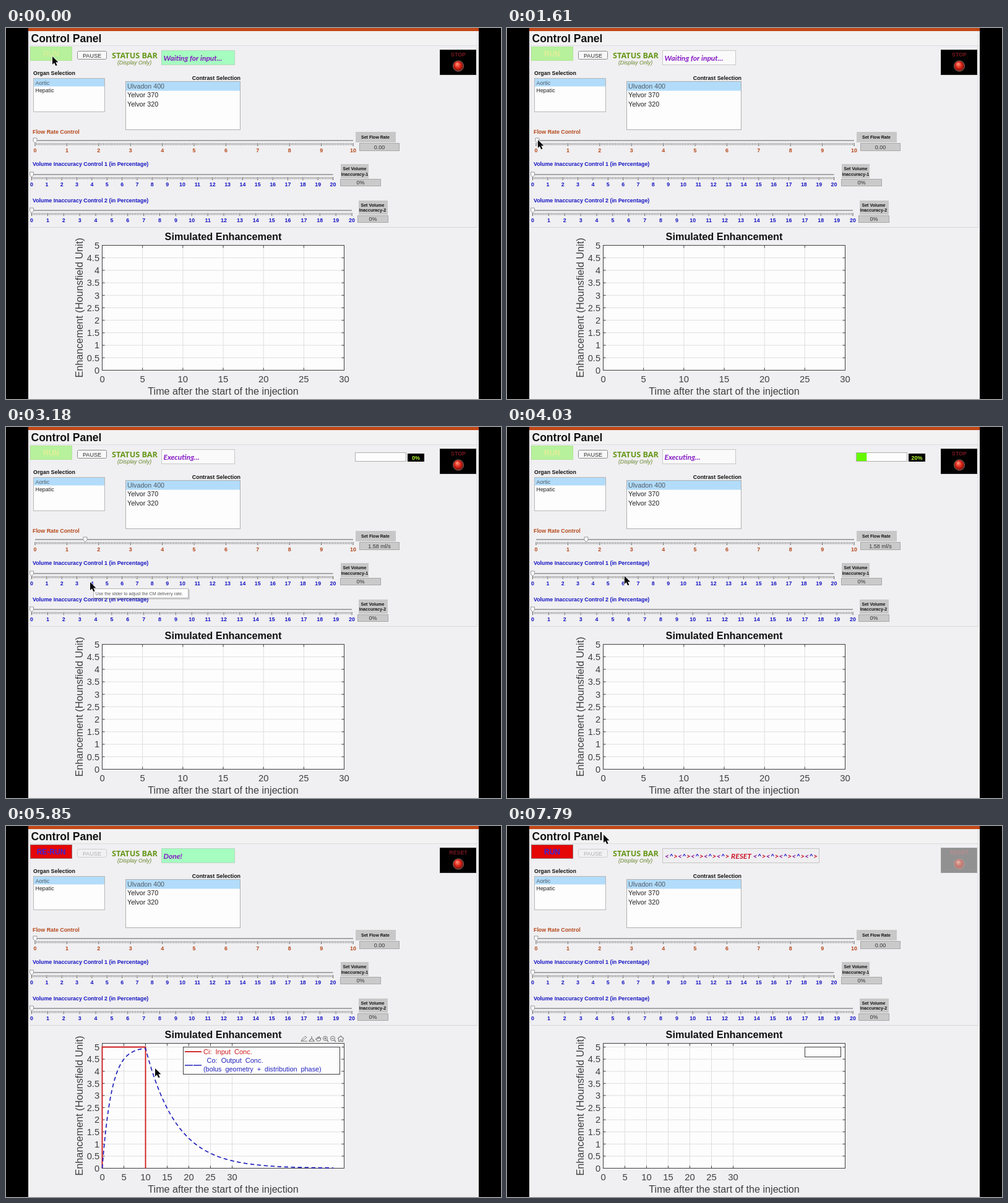
Animation of 800 by 600 pixels, one loop 7.85 s. Source, as an HTML page with a canvas:

```html
<!DOCTYPE html>
<html lang="en">
<head>
<meta charset="utf-8">
<title>Control Panel</title>
<style>
html, body { margin: 0; width: 100%; height: 100%; overflow: hidden; background: #000; }
canvas { display: block; }
</style>
</head>
<body>
<canvas id="stage" width="800" height="600"></canvas>
<script>
const ctx = document.getElementById('stage').getContext('2d');
const LOOP = 7850;
const SANS = '"Liberation Sans", Arial, sans-serif';
const LATO = 'Lato, "Open Sans", sans-serif';
const OPEN = '"Open Sans", "Noto Sans", sans-serif';
const RUST = '#b5491c', BLUE = '#1616c4', INK = '#404040', RED = '#d01818';

// Moments at which the interface changes state
const T = { calm: 520, grab: 1560, drop: 2120, exec: 2460, done: 5700, reset: 7000 };

// Pointer path: time, x, y
const path = [
  [0, 75, 46], [350, 76, 48], [900, 104, 181], [1060, 106, 183], [1240, 104, 183],
  [1500, 48, 181], [1560, 48, 181], [2120, 129, 181], [2450, 129, 181],
  [2950, 134, 246], [3180, 136, 251], [3520, 138, 251], [4050, 190, 241],
  [4790, 470, 240], [4820, 490, 238], [4850, 509, 236], [4880, 524, 241],
  [5000, 540, 248], [5600, 262, 380], [5850, 241, 392], [6200, 243, 392],
  [6800, 728, 62], [7150, 730, 62], [7720, 160, 17], [7790, 156, 14], [7850, 156, 14]
];

function pointer(t) {
  let i = 1;
  while (i < path.length - 1 && path[i][0] < t) i++;
  const [t0, x0, y0] = path[i - 1], [t1, x1, y1] = path[i];
  let k = Math.min(1, Math.max(0, (t - t0) / (t1 - t0)));
  if (t1 - t0 > 300) k = k * k * (3 - 2 * k);
  return [x0 + (x1 - x0) * k, y0 + (y1 - y0) * k];
}

function rect(x, y, w, h, fill, stroke) {
  ctx.fillStyle = fill;
  ctx.fillRect(x, y, w, h);
  if (!stroke) return;
  ctx.strokeStyle = stroke;
  ctx.lineWidth = 1;
  ctx.strokeRect(x + 0.5, y + 0.5, w - 1, h - 1);
}

function text(s, x, y, size, color, opt = {}) {
  ctx.font = `${opt.style || ''} ${size}px ${opt.family || SANS}`;
  ctx.textAlign = opt.align || 'left';
  ctx.fillStyle = color;
  ctx.fillText(s, x, y);
}
const bold = (s, x, y, size, color, align) => text(s, x, y, size, color, { style: 'bold', align });
const mid = (s, x, y, size, color) => text(s, x, y, size, color, { align: 'center' });

function line(points, color, width = 1, dash = []) {
  ctx.strokeStyle = color;
  ctx.lineWidth = width;
  ctx.setLineDash(dash);
  ctx.beginPath();
  points.forEach(([x, y]) => ctx.lineTo(x, y));
  ctx.stroke();
  ctx.setLineDash([]);
}

function arrow(x, y) {
  const shape = [[0, 0], [0, 13], [3, 10.3], [5.4, 15.2], [7.6, 14.2], [5.3, 9.4], [9.4, 9.2]];
  ctx.beginPath();
  shape.forEach(([dx, dy]) => ctx.lineTo(x + dx, y + dy));
  ctx.closePath();
  ctx.strokeStyle = 'rgba(255,255,255,.7)';
  ctx.lineWidth = 1.5;
  ctx.stroke();
  ctx.fillStyle = '#0a0a0a';
  ctx.fill();
}

function slider(x0, x1, y, max, color, labelY, thumb) {
  rect(x0, y, x1 - x0, 2, '#a6a6a6');
  const n = 200, step = (x1 - x0) / n, per = n / max;
  for (let i = 0; i <= n; i++) {
    const major = i % per === 0;
    rect(x0 + i * step - 0.5, y + 5, 1, major ? 5 : 3.5, major ? '#555' : '#858585');
  }
  for (let v = 0; v <= max; v++) {
    bold(v, x0 + v * (x1 - x0) / max, labelY, 8.85, color, 'center');
  }
  ctx.beginPath();
  [[-3, -3], [3, -3], [3, 2], [0, 5], [-3, 2]].forEach(([dx, dy]) => ctx.lineTo(thumb + dx, y + dy));
  ctx.closePath();
  ctx.fillStyle = '#fafafa';
  ctx.fill();
  ctx.strokeStyle = '#9a9a9a';
  ctx.lineWidth = 1;
  ctx.stroke();
}

function valueBox(x, y, w, h, s) {
  rect(x, y, w, h, '#cacaca', '#a8a8a8');
  mid(s, x + w / 2, y + h / 2 + 3.2, 9, '#333');
}

function tip(x, y, w, h, rows) {
  ctx.fillStyle = 'rgba(0,0,0,.14)';
  ctx.fillRect(x + 2, y + 2, w, h);
  rect(x, y, w, h, '#fcfcfc', '#b4b4b4');
  rows.forEach((s, i) => text(s, x + 3.5, y + 10.5 + i * 9.5, 7.2, '#5a5a5a'));
}

function frameBase() {
  rect(0, 0, 800, 600, '#000');
  rect(36, 0, 728, 600, '#f0eff1');
  rect(36, 0, 728, 5, '#c24816');
  rect(38, 5, 724, 23, '#f3f2f3');
  rect(38, 28, 724, 1, '#dcdbdd');
  rect(38, 322, 724, 1, '#d6d5d7');
  rect(38, 5, 1, 318, '#e2e1e3');
  rect(761, 5, 1, 318, '#dddcde');
  bold('Control Panel', 40.5, 23, 17.55, '#111');
}

function runButton(t) {
  const red = t >= T.done;
  rect(39, 30, 68, 23, red ? '#e50606' : '#b7f19b', red ? '#9a6a6a' : '#b0e698');
  const label = red && t < T.reset ? 'RE-RUN' : 'RUN';
  text(label, 73, 45.5, 12, red ? '#3a24d8' : '#e2ee98',
    { align: 'center', style: t < 120 ? '' : 'bold' });
  ctx.beginPath();
  ctx.roundRect(115.5, 37.5, 47, 13, 2);
  ctx.fillStyle = red ? '#f1f0f2' : '#f8f8f8';
  ctx.fill();
  ctx.strokeStyle = red ? '#cfcfcf' : '#8c8c8c';
  ctx.lineWidth = 1;
  ctx.stroke();
  mid('PAUSE', 139, 47.5, 9.1, red ? '#b2b2b2' : '#2c2c2c');
}

function statusBar(t) {
  text('STATUS BAR', 208, 49, 12.7, '#67981a', { style: 'bold', family: OPEN, align: 'center' });
  text('(Display Only)', 207.5, 59, 8.8, '#67862c', { style: 'italic', align: 'center' });
  const say = (s, x, color) => text(s, x, 52.5, 12, color, { style: 'italic bold', family: LATO });
  if (t >= T.reset) {
    rect(251, 36, 254, 24, '#efeef0', '#c6c6c6');
    let x = 255;
    for (const ch of '<^><^><^><^><^> RESET <^><^><^><^><^>') {
      say(ch, x, ch === '<' ? '#8a1c9c' : ch === '^' ? '#3426d0' : '#cc1428');
      x += ctx.measureText(ch).width;
    }
    return;
  }
  const green = t < T.calm || (t >= T.exec && t < T.exec + 240) || (t >= T.done && t < T.done + 600);
  rect(251, 36, 119, 24, green ? '#a6fdc0' : '#fafafa', green ? '#b4d8c0' : '#c8c8c8');
  say(t < T.exec ? 'Waiting for input...' : t < T.done ? 'Executing...' : 'Done!', 254.5, '#8418c4');
}

function progress(t) {
  if (t < T.exec || t >= T.done) return;
  const at = u => [3600, 4150, 4700, 5200, 5580].filter(s => u >= s).length * 20;
  rect(564, 41, 83, 15, '#fdfdfd', '#b0b0b0');
  rect(565, 42, 0.86 * at(t - 220) * 0.95, 13, '#66f800');
  rect(649, 43, 27, 13, '#000');
  bold(at(t) + '%', 662.5, 52.5, 9, '#b6fb30', 'center');
}

function stopButton(t) {
  const off = t >= T.reset;
  rect(701, 35, 59, 41, off ? '#929192' : '#000', off ? '#a0a0a0' : '#222');
  bold(t < T.done ? 'STOP' : 'RESET', 731, 45.5, 8.8, off ? '#b98c8e' : '#761820', 'center');
  const g = ctx.createRadialGradient(729, 58, 1, 731, 61.5, 9);
  const tones = off ? ['#e6b4a8', '#c87c72', '#a88884'] : ['#ff8a70', '#dc2418', '#58100c'];
  tones.forEach((c, i) => g.addColorStop(i / 2, c));
  ctx.beginPath();
  ctx.arc(731, 61.5, 8.5, 0, Math.PI * 2);
  ctx.fillStyle = g;
  ctx.fill();
  ctx.strokeStyle = off ? '#b0a4a4' : '#a08884';
  ctx.lineWidth = 0.8;
  ctx.stroke();
}

function lists() {
  bold('Organ Selection', 44, 75.5, 8.87, '#111');
  rect(44, 81, 116, 55, '#fdfdfd', '#b8b8b8');
  rect(45, 82, 114, 12.5, '#b2dcfa');
  text('Aortic', 47.5, 91.5, 8.9, '#505c66');
  text('Hepatic', 47.5, 104, 8.9, '#222');
  bold('Contrast Selection', 379, 84, 8.85, '#111', 'right');
  rect(193, 86, 186, 79, '#fdfdfd', '#b0b0b0');
  rect(194, 87, 184, 14.5, '#b2dcfa');
  ['Ulvadon 400', 'Yelvor 370', 'Yelvor 320'].forEach((s, i) =>
    text(s, 196, 97.5 + i * 14.8, 10.7, i ? '#222' : '#505c66'));
}

function sliders(t) {
  let thumb = 47;
  if (t >= T.grab && t < T.done) thumb = t < T.drop ? Math.max(47, pointer(t)[0] - 1) : 128;
  bold('Flow Rate Control', 43, 171.3, 8.87, RUST);
  slider(47, 561, 181, 10, RUST, 201.3, thumb);
  rect(565, 168, 65, 17, '#c8c8c8');
  bold('Set Flow Rate', 597, 179, 7, '#111', 'center');
  valueBox(571, 186, 65, 13, t >= T.exec && t < T.done ? '1.58 ml/s' : '0.00');

  bold('Volume Inaccuracy Control 1 (in Percentage)', 43, 223.2, 8.84, BLUE);
  slider(41.5, 528.5, 236, 20, BLUE, 255.8, 41.5);
  rect(541, 220, 45, 23, '#c8c8c8');
  bold('Set Volume', 563.5, 230, 7.1, '#111', 'center');
  bold('Inaccuracy-1', 563.5, 238.5, 7.1, '#111', 'center');
  valueBox(540, 244, 66, 12, '0%');

  bold('Volume Inaccuracy Control 2 (in Percentage)', 43, 281.7, 8.84, BLUE);
  slider(41.5, 559, 294, 20, BLUE, 313.5, 41.5);
  rect(570, 279, 47, 23, '#c8c8c8');
  bold('Set Volume', 592.5, 289, 7.1, '#111', 'center');
  bold('Inaccuracy-2', 592.5, 297.3, 7.1, '#111', 'center');
  valueBox(568, 303, 50, 12, '0%');
}

// Model response: saturating rise for ten seconds, then washout
const output = s => s < 10 ? 5 * (1 - Math.exp(-s / 2.17)) : 4.95 * Math.exp((10 - s) / 7.2);

function plot(t) {
  const L = 155.5, R = 546.5, top = 351.5, base = 553.5, wide = t >= T.done;
  const X = s => L + s * (wide ? 7 : 391 / 30);
  const Y = v => base - v * (wide ? 39.2 : 40.4);
  rect(L, top, R - L, base - top, '#fdfdfd');
  for (let i = 0; i <= 6; i++) line([[X(i * 5), top], [X(i * 5), base]], '#dfdfdf');
  for (let i = 0; i <= 10; i++) line([[L, Y(i / 2)], [R, Y(i / 2)]], '#dfdfdf');
  ctx.strokeStyle = INK;
  ctx.strokeRect(L, top, R - L, base - top);
  for (let i = 0; i <= 6; i++) {
    const x = X(i * 5);
    line([[x, base], [x, base - 4]], INK);
    line([[x, top], [x, top + 4]], INK);
    mid(i * 5, x, 573, 14.8, INK);
  }
  for (let i = 0; i <= 10; i++) {
    const y = Y(i / 2);
    line([[L, y], [L + 4, y]], INK);
    line([[R, y], [R - 4, y]], INK);
    text(i / 2, 151, y + 5.2, 14.6, INK, { align: 'right' });
  }
  bold('Simulated Enhancement', 351, 343, 16.27, '#111', 'center');
  mid('Time after the start of the injection', 351, 593, 16.15, INK);
  ctx.save();
  ctx.translate(124, 452.5);
  ctx.rotate(-Math.PI / 2);
  mid('Enhancement (Hounsfield Unit)', 0, 0, 16.3, INK);
  ctx.restore();
  if (t < T.reset) curves(t, X, Y);
  if (wide) legend(t);
}

function curves(t, X, Y) {
  const p = Math.min(1, (t - 4100) / 650);
  if (p <= 0) return;
  const pts = [[X(0), Y(0)], [X(0), Y(Math.min(5, p * 20))]];
  if (p > 0.25) pts.push([X(Math.min(10, (p - 0.25) * 20)), Y(5)]);
  if (p > 0.75) pts.push([X(10), Y(5 - (p - 0.75) * 20)]);
  line(pts, RED, 1.8);
  if (t < 4950) {
    if (p > 0.75) line([[X(10), Y(5) + 1], pts[3]], '#7c2c20', 1.8);
    return;
  }
  const end = t >= T.done ? 53.5 : Math.min(30, (t - 4950) / 21);
  const trace = [];
  for (let s = 0; s < end; s += 0.1) trace.push([X(s), Y(output(s))]);
  line(trace, '#2222bc', 1.7, [6.5, 4.5]);
}

function legend(t) {
  if (t >= T.reset) return rect(481, 357, 59, 17, '#fdfdfd', INK);
  rect(286, 357, 254, 45, '#fdfdfd', INK);
  line([[289, 365], [316, 365]], RED, 1.8);
  line([[289, 387], [316, 387]], '#2222bc', 1.7, [13, 1]);
  ctx.wordSpacing = '3px';
  text('Ci: Input Conc.', 319, 368.5, 11, RED);
  text('Co: Output Conc.', 324.5, 383, 11, '#2222bc');
  text('(bolus geometry + distribution phase)', 319, 397, 10.85, '#2222bc');
  ctx.wordSpacing = '0px';
  const [x, y] = pointer(t);
  if (x < 547 && y > 340) tools();
}

function tools() {
  const c = '#777';
  line([[477, 348], [479, 344], [484, 340], [486, 342], [481, 346], [477, 348], [487, 348]], c, 0.9);
  line([[494, 340], [494, 344], [492, 345], [490, 348], [498, 348], [496, 345], [494, 344]], c, 1.2);
  line([[503, 348], [500, 344], [503, 345], [503, 341], [505, 344], [506, 340], [507, 344],
    [509, 342], [508, 347], [503, 348]], c, 1);
  for (const x of [516, 528]) {
    ctx.beginPath();
    ctx.arc(x, 343.5, 3.5, 0, Math.PI * 2);
    ctx.stroke();
    line([[x + 2.5, 346], [x + 5, 349]], c, 1.2);
    line([[x - 2, 343.5], [x + 2, 343.5]], c);
  }
  line([[516, 341.5], [516, 345.5]], c);
  line([[536, 344], [541, 339.5], [546, 344]], c, 1.2);
  line([[537.5, 344], [537.5, 348.5], [540, 348.5], [540, 345.5], [542, 345.5], [542, 348.5],
    [544.5, 348.5], [544.5, 344]], c);
}

function draw(t) {
  frameBase();
  runButton(t);
  statusBar(t);
  progress(t);
  stopButton(t);
  lists();
  sliders(t);
  plot(t);
  const hint = 'Use the slider to adjust the CM delivery rate.';
  if (t > 950 && t < 1260) {
    tip(111, 194, 156, 25, [hint, 'Slider works only after clicking the run button.']);
  }
  if (t > 3080 && t < 3530) tip(141, 261, 154, 16, [hint]);
  if (t > 4800 && t < 4940) {
    arrow(...pointer(t - 60));
    arrow(...pointer(t - 30));
  }
  arrow(...pointer(t));
}

const start = performance.now();
function tick() {
  draw((performance.now() - start) % LOOP);
  requestAnimationFrame(tick);
}
tick();
</script>
</body>
</html>
```
